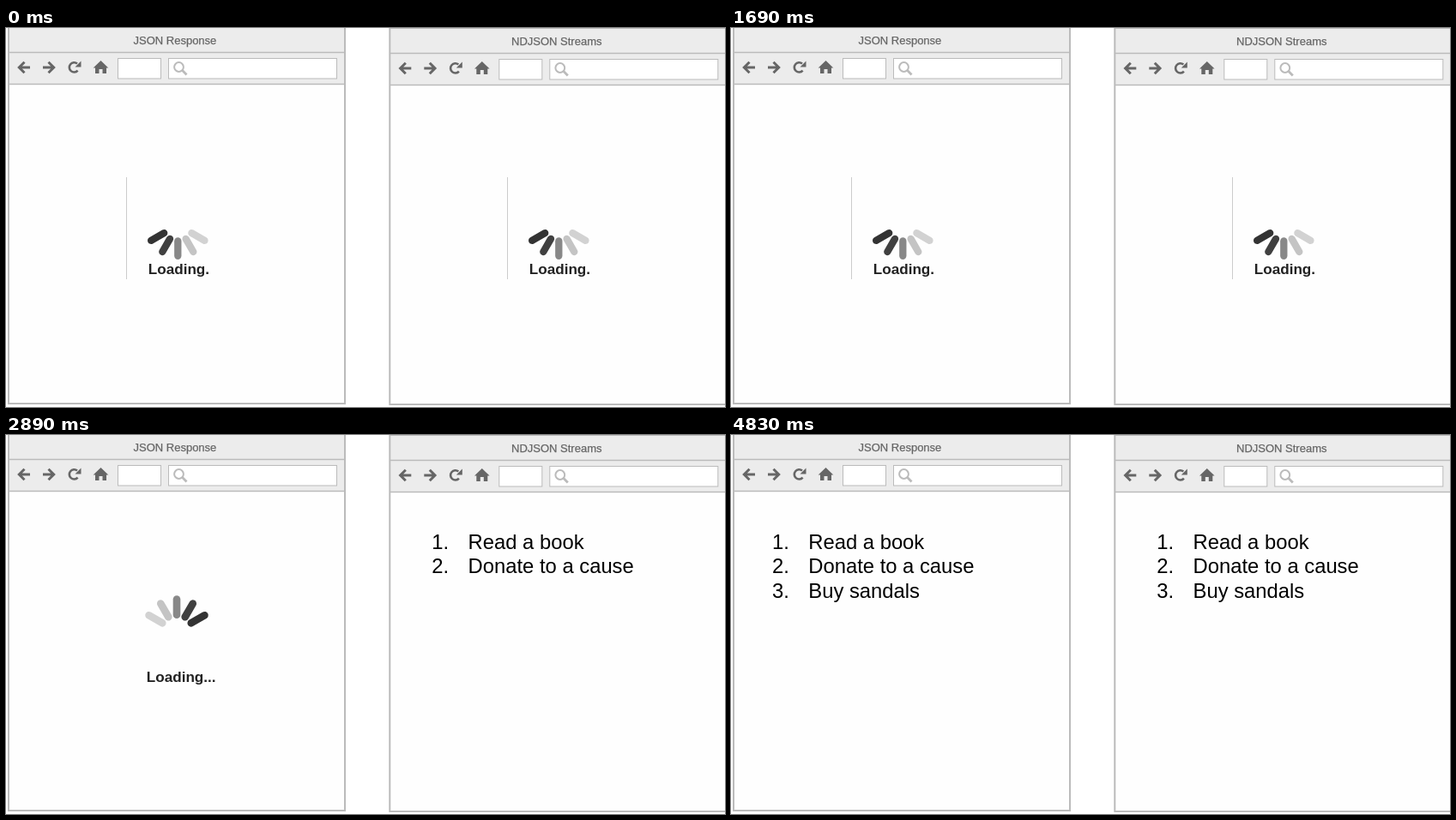
An HTML page that plays this animation: 838 by 442 pixels, repeating every 7840 ms.

```html
<!DOCTYPE html>
<html lang="en">
<head>
<meta charset="utf-8">
<title>Response loading comparison</title>
<style>
  html, body { margin: 0; width: 100%; height: 100%; overflow: hidden; background: #fff; }
  svg { display: block; width: 838px; height: 442px; font-family: "Liberation Sans", Arial, sans-serif; }
  .title { font-size: 13px; fill: #666; stroke: #666; stroke-width: .25px; }
  .load { font-size: 17.1px; font-weight: bold; fill: #222; }
  .list { font-size: 23.8px; fill: #000; }

  .anim { animation: 7840ms step-end infinite; }
  .low { animation-name: low; }
  .side { animation-name: side; }
  .high { animation-name: high; }
  .until-first { animation-name: until-first; }
  .until-all { animation-name: until-all; }
  .first { animation-name: first; }
  .second { animation-name: second; }
  .third { animation-name: third; }
  .all { animation-name: all-rows; }

  /* spinner poses take turns */
  @keyframes low {
    0%, 21.5561%, 46.4285% { opacity: 1; }
    6.3775%, 29.2091%, 54.0816%, 100% { opacity: 0; }
  }
  @keyframes side {
    0%, 14.0306%, 36.8622%, 61.6071%, 100% { opacity: 0; }
    6.3775%, 29.2091%, 54.0816% { opacity: 1; }
  }
  @keyframes high {
    0%, 21.5561%, 46.4285%, 100% { opacity: 0; }
    14.0306%, 36.8622% { opacity: 1; }
  }
  @keyframes until-first { 0% { opacity: 1; } 29.2091%, 100% { opacity: 0; } }
  @keyframes until-all { 0% { opacity: 1; } 61.6071%, 100% { opacity: 0; } }
  @keyframes first { 0% { opacity: 0; } 29.2091%, 100% { opacity: 1; } }
  @keyframes second { 0% { opacity: 0; } 36.8622%, 100% { opacity: 1; } }
  @keyframes third { 0% { opacity: 0; } 46.4285%, 100% { opacity: 1; } }
  @keyframes all-rows { 0% { opacity: 0; } 61.6071%, 100% { opacity: 1; } }
</style>
</head>
<body>
<svg viewBox="0 0 838 442">
  <defs>
    <g id="browser">
      <rect x="3" y="-1" width="392" height="439" fill="#fefefe"/>
      <rect x="3" y="-1" width="392" height="66" fill="#ececec"/>
      <path d="M3 28.5H395M3 65.5H395" stroke="#bbb" stroke-width="1.7"/>
      <rect x="3" y="-1" width="392" height="439" fill="none" stroke="#bbb" stroke-width="2"/>
      <g fill="none" stroke="#666" stroke-width="3">
        <path d="M28 46H16M21.5 39.8L15.3 46L21.5 52.2"/>
        <path d="M43 46H55M49.5 39.8L55.7 46L49.5 52.2"/>
        <path d="M83.6 49.6A5.6 5.6 0 1 1 83 41.6" stroke-width="2.6"/>
      </g>
      <path d="M87.5 38.5V45.5H80.5Z" fill="#666"/>
      <path d="M110.5 38L119.3 46.6H117V53H112.5V48H108.5V53H104V46.6H101.7Z" fill="#666"/>
      <g fill="#fff" stroke="#bbb">
        <rect x="130.5" y="35.5" width="50" height="23.5"/>
        <rect x="189.5" y="35.5" width="196" height="23.5"/>
        <circle cx="201.5" cy="45.5" r="5.4" stroke-width="2"/>
        <path d="M205.6 49.6L210.5 54.5" stroke-width="2.8"/>
      </g>
    </g>

    <g id="fan" stroke-width="8.3" stroke-linecap="round">
      <path d="M18.6 0H36" transform="rotate(150)" stroke="#333"/>
      <path d="M18.6 0H36" transform="rotate(120)" stroke="#404040"/>
      <path d="M18.6 0H36" transform="rotate(90)" stroke="#888"/>
      <path d="M18.6 0H36" transform="rotate(60)" stroke="#c4c4c4"/>
      <path d="M18.6 0H36" transform="rotate(30)" stroke="#d2d2d2"/>
    </g>
    <g id="low">
      <path d="M140.5 174V293" stroke="#ccc"/>
      <use href="#fan" transform="translate(200.3 229.8)"/>
      <text class="load" x="165.8" y="287">Loading.</text>
    </g>
    <g id="side">
      <use href="#fan" transform="translate(199.6 229.2) rotate(90) scale(1.03)"/>
      <text class="load" x="164.6" y="287.5">Loading..</text>
    </g>
    <g id="high">
      <use href="#fan" transform="translate(199 229) rotate(180) scale(1.04)"/>
      <text class="load" x="163.8" y="287.7">Loading...</text>
    </g>

    <g id="row1" class="list"><text x="48" y="133">1.</text><text x="90.3" y="133">Read a book</text></g>
    <g id="row2" class="list"><text x="48" y="161">2.</text><text x="90.3" y="161">Donate to a cause</text></g>
    <g id="row3" class="list"><text x="48" y="190">3.</text><text x="90.3" y="190">Buy sandals</text></g>
  </defs>

  <use href="#browser"/>
  <text class="title" x="148.5" y="19">JSON Response</text>
  <g class="anim until-all">
    <use href="#low" class="anim low"/>
    <use href="#side" class="anim side"/>
    <use href="#high" class="anim high"/>
  </g>
  <g class="anim all">
    <use href="#row1"/>
    <use href="#row2"/>
    <use href="#row3"/>
  </g>

  <use href="#browser" x="444.3" y="1"/>
  <text class="title" x="589" y="20">NDJSON Streams</text>
  <g class="anim until-first" transform="translate(444 0)">
    <use href="#low" class="anim low"/>
    <use href="#side" class="anim side"/>
    <use href="#high" class="anim high"/>
  </g>
  <g transform="translate(448.3 0)">
    <use href="#row1" class="anim first"/>
    <use href="#row2" class="anim second"/>
    <use href="#row3" class="anim third"/>
  </g>
</svg>
</body>
</html>
```
